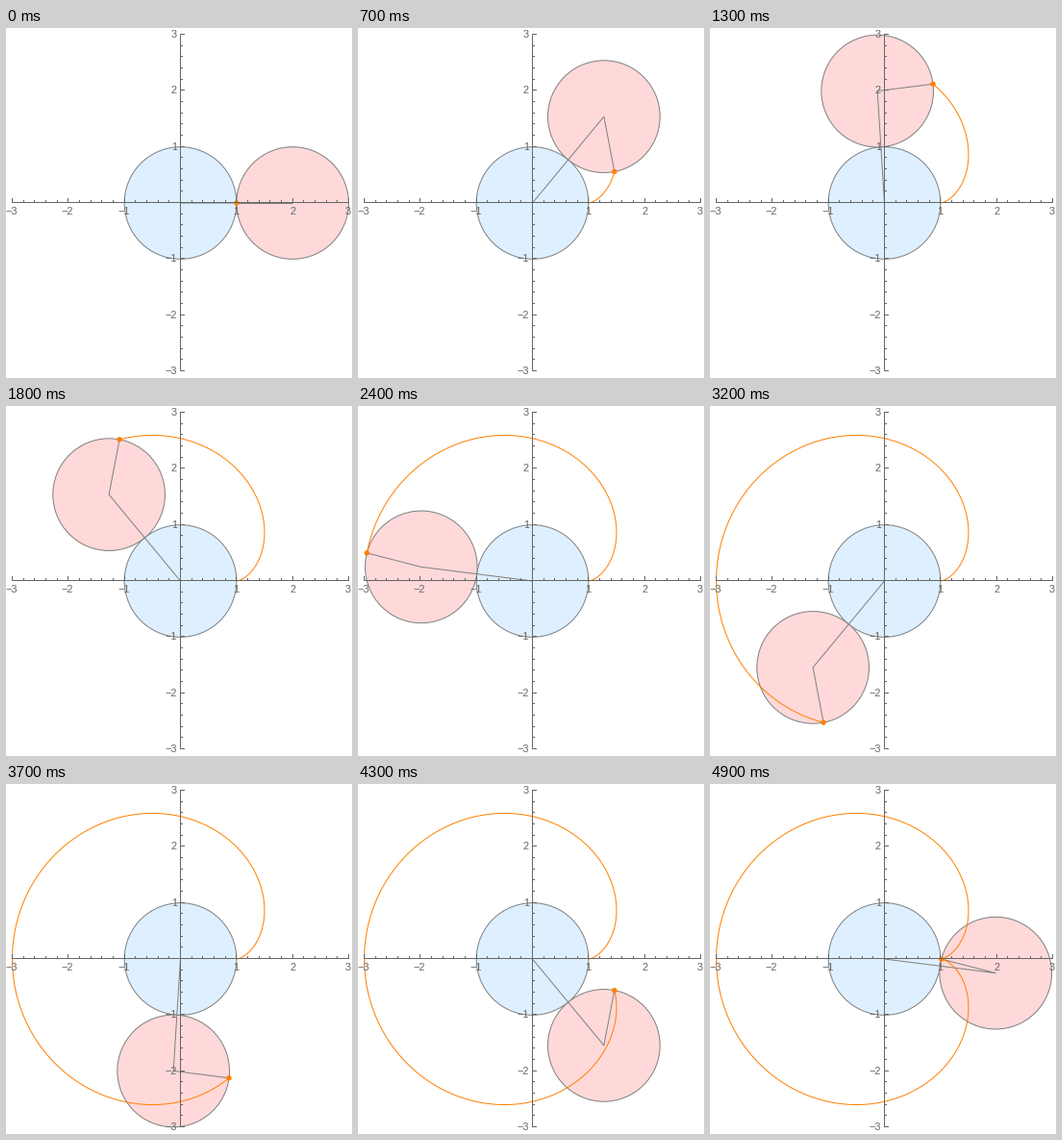
Recreate the animation shown at these times as a matplotlib script. Size 360 by 364 pixels, loop 5 s.

```python
import numpy as np
import matplotlib.pyplot as plt
from matplotlib.animation import FuncAnimation
from matplotlib.patches import Circle

W, H, DPI = 360, 364, 100
FRAMES, INTERVAL = 50, 100
CX, CY, UNIT = 181.5, 182.0, 58.33
AXIS = 181.5
PX = 72 / DPI  # one pixel in points
GRAY, AXIS_GRAY, ORANGE = "0.5", "0.4", (1, 0.5, 0)


def to_px(x, y):
    return CX + UNIT * x, CY - UNIT * y


def cardioid(t):
    return 2 * np.cos(t) - np.cos(2 * t), 2 * np.sin(t) - np.sin(2 * t)


fig = plt.figure(figsize=(W / DPI, H / DPI), dpi=DPI, facecolor="white")
ax = fig.add_axes([0, 0, 1, 1])
ax.set_xlim(0, W)
ax.set_ylim(H, 0)
ax.axis("off")


def disk(color, z):
    return ax.add_patch(Circle((CX, CY), UNIT, fc=color, ec=GRAY, lw=PX, zorder=z))


def axis_line(xs, ys):
    # Coordinates already sit on pixel centres, so snapping would shift them.
    ax.plot(xs, ys, color=AXIS_GRAY, lw=PX, zorder=8,
            solid_capstyle="butt", snap=False)


def label(x, y, value, align):
    ax.text(x, y, str(value).replace("-", "\u2212"), ha=align, va="baseline",
            family="Liberation Sans", size=11 * PX, color=AXIS_GRAY, zorder=9)


def draw_axes():
    axis_line([6, 357], [AXIS, AXIS])
    axis_line([AXIS, AXIS], [6, 357])
    for i in range(-15, 16):
        if i == 0:
            continue
        major = i % 5 == 0
        size = 4.5 if major else 2.5
        x = np.floor(AXIS + i * UNIT / 5) + 0.5
        y = np.floor(AXIS - i * UNIT / 5) + 0.5
        axis_line([x, x], [AXIS, AXIS - size])
        axis_line([AXIS, AXIS + size], [y, y])
        if major:
            label(x - 0.5, 194.5, i // 5, "center")
            label(178, y + 3.5, i // 5, "right")


disk((0.87, 0.94, 1), 1)
roller = disk((1, 0.85, 0.85), 2)
arms, = ax.plot([], [], color=GRAY, lw=PX, zorder=3, snap=False)
trace, = ax.plot([], [], color=ORANGE, lw=PX, zorder=4, snap=False)
pen = ax.add_patch(Circle((CX, CY), 2.7, fc=ORANGE, ec="none", zorder=5))
draw_axes()


def update(frame):
    angle = 2 * np.pi * frame / FRAMES
    center = to_px(2 * np.cos(angle), 2 * np.sin(angle))
    tip = to_px(*cardioid(angle))
    roller.center = center
    pen.center = tip
    arms.set_data([CX, center[0], tip[0]], [CY, center[1], tip[1]])
    trace.set_data(*to_px(*cardioid(np.linspace(0, angle, 200))))
    return roller, arms, trace, pen


anim = FuncAnimation(fig, update, frames=FRAMES, interval=INTERVAL,
                     repeat=True, repeat_delay=0, blit=False)
plt.show()
```
